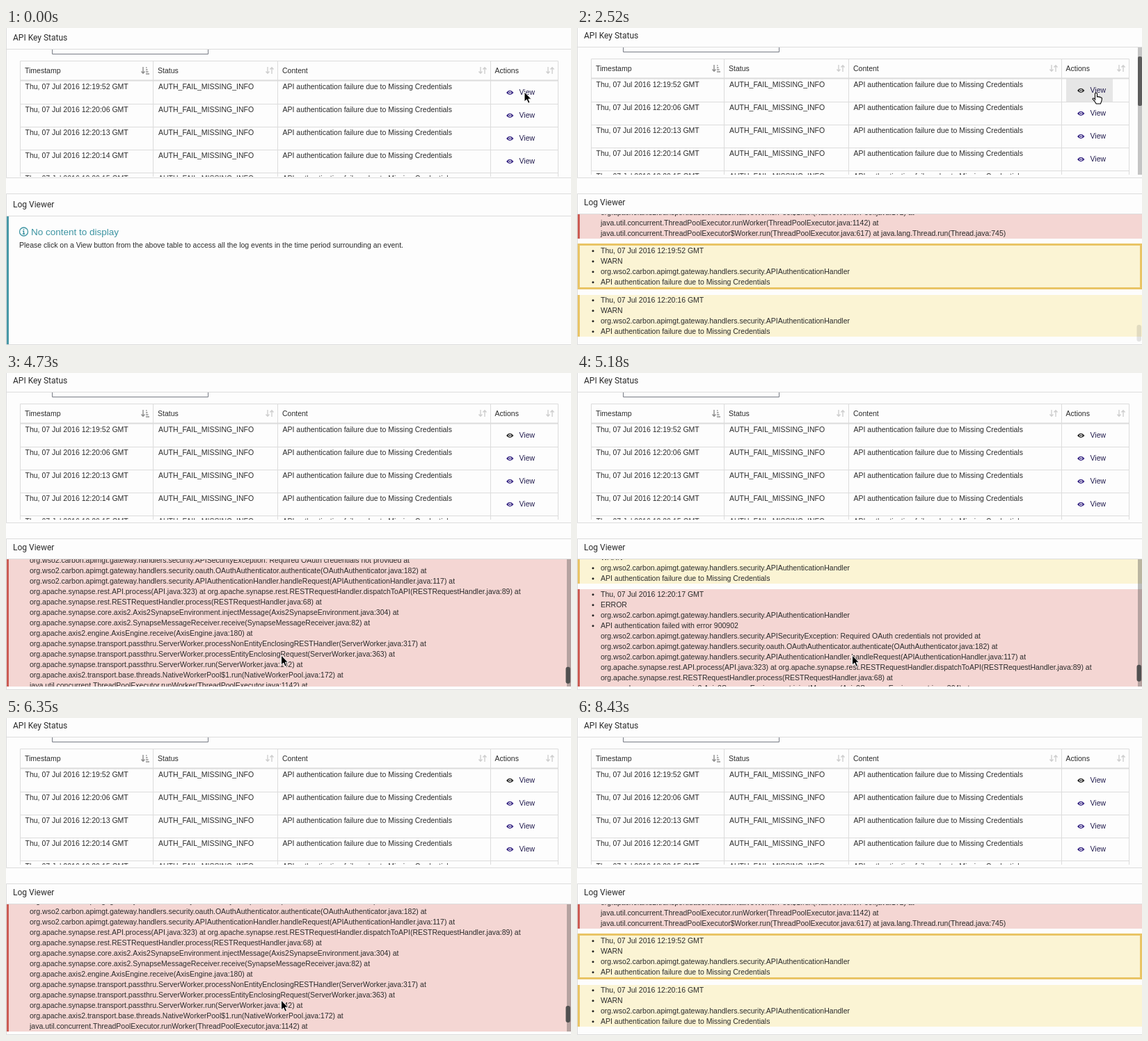
These frames come from a looping animation (812x456 px, 9000 ms). An HTML page:

```html
<!DOCTYPE html>
<html lang="en">
<head>
<meta charset="utf-8">
<title>Log viewer</title>
<style>
html, body { margin: 0; width: 100%; height: 100%; overflow: hidden; background: #fdfdfd; }
svg { display: block; }
text { font: 10.5px "Liberation Sans", Arial, sans-serif; fill: #2b2b2b; white-space: pre; }
.title { font: 12px Roboto, sans-serif; }
.info { font-size: 13.5px; fill: #3d94a2; }
.line { fill: none; stroke: #dcdcdc; }
.sort { fill: none; stroke: #cfcfcf; stroke-width: 1.4; }
.dark { stroke: #8d8d8d; }
</style>
</head>
<body>
<svg width="812" height="456" viewBox="0 0 812 456">
  <clipPath id="tableClip"><rect y="28" width="812" height="183"/></clipPath>
  <clipPath id="logClip"><rect y="268" width="812" height="183"/></clipPath>
  <g id="page">
    <path class="line" d="M.5 0V215.5H812M812 238.5H.5V455.5H812"/>
    <g id="top">
      <text class="title" x="10" y="15">API Key Status</text>
      <path class="line" d="M1 27.5H812"/>
      <g id="table" clip-path="url(#tableClip)"></g>
    </g>
    <g id="tableBar">
      <rect x="806" y="28" width="6" height="183" fill="#c4c4c4"/>
      <rect x="806" y="41" width="6" height="71" rx="2" fill="#5c5c5c"/>
    </g>
    <g id="logHead">
      <text class="title" x="10" y="255">Log Viewer</text>
      <path class="line" d="M1 267.5H812"/>
    </g>
    <g id="empty">
      <rect x="1" y="271" width="3" height="184" fill="#4798a6"/>
      <g id="notice">
        <circle cx="25.5" cy="290" r="6" fill="none" stroke="#3d94a2" stroke-width="1.3"/>
        <path d="M25.5 286v1.6M24 289.3h1.5v4M23.8 293.3h3.4" fill="none" stroke="#3d94a2" stroke-width="1.4"/>
        <text class="info" x="36" y="295">No content to display</text>
        <text x="19" y="313">Please click on a View button from the above table to access all the log events in the time period surrounding an event.</text>
      </g>
    </g>
    <g id="log" clip-path="url(#logClip)"><g id="blocks"></g></g>
    <rect id="track" x="806" y="268" width="6" height="183" fill="#404040" fill-opacity=".35"/>
    <rect id="thumb" x="804.5" width="6.5" rx="3" fill="#505050"/>
  </g>
  <path id="arrow" d="M0 0V14L3.3 11 5.6 16.3 8 15.2 5.8 10.2H10Z" fill="#000" stroke="#fff"/>
  <path id="hand" transform="translate(740 93)" fill="#fff" stroke="#000" stroke-width="1.1"
    d="M4.5 11V1.8a1.5 1.5 0 0 1 3 0V6q1.5-1 2.6.4 1.6-.7 2.3.6 2-.3 2 1.6 0 3.5-2 7.4H6.2Q4.5 12.7 1 9.2 1 7 4.5 9"/>
</svg>
<script>
const $ = id => document.getElementById(id);
const text = (x, y, s, attrs = '') => `<text x="${x}" y="${y}" ${attrs}>${s}</text>`;
const rect = (x, y, w, h, fill, attrs = '') =>
  `<rect x="${x}" y="${y}" width="${w}" height="${h}" fill="${fill}" ${attrs}/>`;

// Status table
const failure = 'API authentication failure due to Missing Credentials';
const sortIcon = x =>
  `<path class="sort" d="M${x} 53v9m-2.5-2.5l2.5 2.8 2.5-2.8M${x + 6} 63v-9m-2.5 2.5l2.5-2.8 2.5 2.8"/>`;

function eye(y, id) {
  return `<g ${id ? `id="${id}"` : ''} fill="#3b2a86"><path d="M719 ${y}q5-6.6 10.5 0-5.5 6.6-10.5 0Z"/>` +
    `<circle cx="724.2" cy="${y}" r="2.1" fill="#fdfdfd"/><circle cx="724.2" cy="${y}" r="1.1"/></g>`;
}

function tableMarkup() {
  let out = '<path d="M66.5 28V34.5H290.5V28" fill="none" stroke="#777b85"/>';
  out += rect(703, 73, 67, 33, '#e6e6e6', 'id="hover"');
  out += '<path class="line" d="M20.5 215V44.5H793.5V215M211.5 44V215M390.5 44V215M696.5 44V215"/>';
  out += rect(20, 71.5, 774, 2, '#dcdcdc');
  [[27, 'Timestamp'], [218, 'Status'], [397, 'Content'], [702.5, 'Actions']]
    .forEach(([x, s]) => out += text(x, 62, s));
  out += '<path class="sort dark" d="M197 53v9m-2.5-2.5l2.5 2.8 2.5-2.8M201 54h1.5M201 57h2.5M201 60h3.5M201 63h5"/>';
  [376, 682, 779].forEach(x => out += sortIcon(x));
  ['19:52', '20:06', '20:13', '20:14', '20:15'].forEach((time, i) => {
    const y = 85 + 33 * i;
    out += text(27.5, y, `Thu, 07 Jul 2016 12:${time} GMT`) +
      text(219, y, 'AUTH_FAIL_MISSING_INFO') + text(397.5, y, failure) +
      text(737.5, y + 8, 'View', 'style="fill:#221c4e"') + eye(y + 5, i ? '' : 'firstEye') +
      `<path class="line" d="M20 ${106.5 + 33 * i}H794"/>`;
  });
  return out;
}

// Log entries
const handler = 'org.wso2.carbon.apimgt.gateway.handlers.security.APIAuthenticationHandler';
const trace = `org.wso2.carbon.apimgt.gateway.handlers.security.APISecurityException: Required OAuth credentials not provided at
org.wso2.carbon.apimgt.gateway.handlers.security.oauth.OAuthAuthenticator.authenticate(OAuthAuthenticator.java:182) at
${handler}.handleRequest(APIAuthenticationHandler.java:117) at
org.apache.synapse.rest.API.process(API.java:323) at org.apache.synapse.rest.RESTRequestHandler.dispatchToAPI(RESTRequestHandler.java:89) at
org.apache.synapse.rest.RESTRequestHandler.process(RESTRequestHandler.java:68) at
org.apache.synapse.core.axis2.Axis2SynapseEnvironment.injectMessage(Axis2SynapseEnvironment.java:304) at
org.apache.synapse.core.axis2.SynapseMessageReceiver.receive(SynapseMessageReceiver.java:82) at
org.apache.axis2.engine.AxisEngine.receive(AxisEngine.java:180) at
org.apache.synapse.transport.passthru.ServerWorker.processNonEntityEnclosingRESTHandler(ServerWorker.java:317) at
org.apache.synapse.transport.passthru.ServerWorker.processEntityEnclosingRequest(ServerWorker.java:363) at
org.apache.synapse.transport.passthru.ServerWorker.run(ServerWorker.java:142) at
org.apache.axis2.transport.base.threads.NativeWorkerPool$1.run(NativeWorkerPool.java:172) at
java.util.concurrent.ThreadPoolExecutor.runWorker(ThreadPoolExecutor.java:1142) at
java.util.concurrent.ThreadPoolExecutor$Worker.run(ThreadPoolExecutor.java:617) at java.lang.Thread.run(Thread.java:745)`.split('\n');

function entry(y, time, error, selected) {
  const lines = [`Thu, 07 Jul 2016 12:${time} GMT`, error ? 'ERROR' : 'WARN', handler,
    error ? 'API authentication failed with error 900902' : failure, ...(error ? trace : [])];
  const h = lines.length * 15, edge = error ? '#cb5b53' : '#e9c465';
  let out = rect(1, y, 811, h, error ? '#f4d6d3' : '#fbf4d4') + rect(1, y, 3, h, edge);
  if (selected) out += rect(2.5, y - 1.5, 808, h + 3, 'none', `stroke="${edge}" stroke-width="3"`);
  lines.forEach((s, i) => {
    const base = y + 11 + 15 * i;
    out += text(34, base, s);
    if (i < 4) out += `<circle cx="23" cy="${base - 3.2}" r="1.5" fill="#222"/>`;
  });
  return out;
}

$('table').innerHTML = tableMarkup();
$('blocks').innerHTML = entry(-313, '20:16', true) + entry(-35, '20:16') + entry(33, '20:17', true) +
  entry(313, '19:52', false, true) + entry(384, '20:16');

// Motion advances in short ticks, as in a screen recording
const LOOP = 9000, TICK = 147;
const ticks = (t, start, n) => Math.min(n, Math.max(0, Math.floor((t - start) / TICK) + 1));
const glide = (t, start, n) => { const k = ticks(t, start, n) / n; return k * k * (3 - 2 * k); };
const pick = (t, start, list) => list[ticks(t, start, list.length - 1)];
const within = (t, a, b) => t >= a && t < b;
const show = (id, on) => $(id).setAttribute('opacity', +on);
const move = (id, x, y) => $(id).setAttribute('transform', `translate(${x} ${y})`);

function scrollAt(t) {
  if (t >= 7090) return pick(t, 7090, [552, 550, 543, 260, 0, 0]);
  if (t >= 6500) return pick(t, 6500, [509, 532, 552]);
  return 278 * glide(t, 4290, 7) + 231 * glide(t, 5320, 8);
}

function barOpacity(t) {
  if (t < 4140) return t < 1330 ? 0 : pick(t, 2520, [1, .15, 0]);
  return pick(t, 8130, [1, .6, .3, 0]);
}

function draw(t) {
  const clicked = t >= 600, loaded = t >= 1330, hover = within(t, 600, 3107);
  const bounce = within(t, 4140, 4290) || within(t, 7531, 7678);
  const scroll = Math.round(scrollAt(t)), bar = barOpacity(t);

  move('page', 0, bounce ? -1 : 0);
  move('top', 0, clicked ? 0 : 3);
  move('notice', 0, clicked ? 0 : 3);
  move('logHead', 0, loaded ? 0 : 3);
  move('blocks', 0, scroll);
  show('empty', !loaded);
  show('log', loaded);

  show('hover', hover);
  show('tableBar', hover);
  $('firstEye').setAttribute('fill', clicked ? '#2b2b2b' : '#3b2a86');

  show('track', t >= 4140 ? bar : 0);
  show('thumb', bar);
  $('thumb').setAttribute('y', bounce ? 436 : 427 - scroll * 14 / 543);
  $('thumb').setAttribute('height', bounce ? 15 : 24);

  const k = glide(t, 2960, 6);
  move('arrow', 745 - 349.5 * k, 92 + 314 * k);
  show('arrow', !hover && t < 8424);
  show('hand', hover);
}

function frame() {
  draw(performance.now() % LOOP);
  requestAnimationFrame(frame);
}
frame();
</script>
</body>
</html>
```
